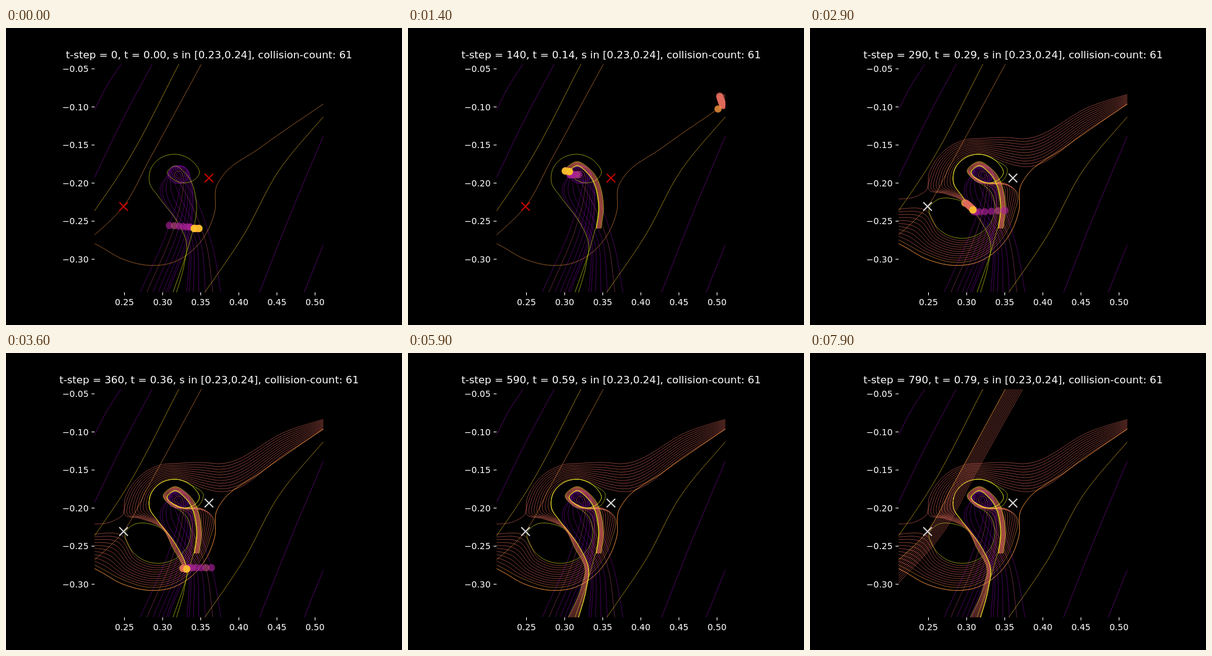
Animation, 640 px wide and 480 px high, one loop 8000 ms. Source, as an HTML page with a canvas:

```html
<!DOCTYPE html>
<html lang="en">
<head>
<meta charset="utf-8">
<title>Orbit families</title>
<style>
html, body { margin: 0; width: 640px; height: 480px; overflow: hidden; background: #000; }
canvas, svg { position: absolute; left: 0; top: 0; width: 640px; height: 480px; }
text { font: 13.89px "DejaVu Sans", sans-serif; fill: #fff; }
#title { font-size: 16.67px; }
</style>
</head>
<body>
<canvas id="plot" width="640" height="480"></canvas>
<svg id="axes" viewBox="0 0 640 480"><text id="title" x="328.2" y="49" text-anchor="middle"></text></svg>
<script>
const LOOP = 8000, STEP = 100;
const PURPLE = '#8a08b4', MAGENTA = '#a82296', PINK = '#e06a5c',
      ORANGE = '#f9973f', GOLD = '#fcce25', YELLOW = '#f0f921';
const ctx = document.getElementById('plot').getContext('2d');
const title = document.getElementById('title');
const paths = [];

// Blend two flat lists of numbers.
const mix = (a, b, u) => a.map((p, i) => p + (b[i] - p) * u);

// n points on an ellipse between two angles in degrees.
function ring([cx, cy, rx, ry, from, to], n) {
  return Array.from({ length: n }, (_, i) => {
    const a = (from + (to - from) * i / (n - 1)) * Math.PI / 180;
    return [cx + rx * Math.cos(a), cy + ry * Math.sin(a)];
  }).flat();
}

// Spline through a flat coordinate list, with tangents weighted by chord length.
function smooth(flat, sub) {
  const n = flat.length / 2;
  const p = Array.from({ length: n }, (_, i) => flat.slice(2 * i, 2 * i + 2));
  const chord = p.slice(1).map((q, i) => Math.hypot(q[0] - p[i][0], q[1] - p[i][1]));
  const slope = (i, d) => (p[i + 1][d] - p[i][d]) / chord[i];
  const tangent = (i, d) => {
    if (i === 0) return slope(0, d);
    if (i === n - 1) return slope(n - 2, d);
    const a = chord[i - 1], b = chord[i];
    return (slope(i - 1, d) * b + slope(i, d) * a) / (a + b);
  };
  const out = [];
  for (let i = 0; i < n - 1; i++) {
    for (let k = 0; k < sub; k++) {
      const s = k / sub, r = 1 - s;
      out.push([0, 1].map(d =>
        p[i][d] * r * r * (1 + 2 * s) + p[i + 1][d] * s * s * (3 - 2 * s) +
        chord[i] * s * r * (tangent(i, d) * r - tangent(i + 1, d) * s)));
    }
  }
  out.push(p[n - 1]);
  return out;
}

// keys: [point index, time] pairs; between two keys the speed is even.
function add(flat, keys, color, opt = {}) {
  const sub = 12, pts = smooth(flat, sub), len = [0], times = [];
  for (let i = 1; i < pts.length; i++) {
    len[i] = len[i - 1] + Math.hypot(pts[i][0] - pts[i - 1][0], pts[i][1] - pts[i - 1][1]);
  }
  for (let k = 0; k < keys.length - 1; k++) {
    const [i0, t0] = keys[k], [i1, t1] = keys[k + 1];
    const a = i0 * sub, b = i1 * sub;
    for (let i = a; i <= b; i++) times[i] = t0 + (t1 - t0) * (len[i] - len[a]) / (len[b] - len[a]);
  }
  paths.push({ pts, times, color, dot: color, alpha: 0.8, ...opt });
}
const still = (flat, color) => add(flat, [], color, { full: true });
const passing = (flat, t0, t1, color) =>
  add(flat, [[0, t0], [flat.length / 2 - 1, t1]], color, { full: true });

// Innermost family: rises, swirls round the centre, falls back.
for (let i = 0; i < 7; i++) {
  const u = 0.96 * (1 - (1 - i / 6) ** 1.5), warm = i === 1;
  add([
    ...mix([217,427, 264,319, 279,270], [264,427, 300,322, 303,275], u),
    ...ring([279, 237, 3 + 15 * u, 3 + 12 * u, 0, -540], 13),
    ...mix([292,254, 332,347, 348,430], [250,251, 293,347, 290,430], u)
  ], [[0, -900], [1, 0], [7, 1400], [16, 2300], [17, 3600], [18, 4450]],
  warm ? '#b8487f' : PURPLE, { full: true, dot: warm ? '#b8487f' : MAGENTA, dotAlpha: 0.65, alpha: 0.7 });
}

// Lone orbits on the outside.
passing([140,139, 160,99, 192,49], 6500, 6800, PURPLE);
passing([140,248, 190,145, 242,48], 6500, 7000, PURPLE);
passing([136,306, 190,226, 285,48], 6450, 7250, GOLD);
passing([520,135, 440,232, 385,333, 316,435], 1500, 2250, GOLD);
passing([519,160, 450,325, 406,437], 1600, 2150, PURPLE);
passing([519,335, 478,437], 1900, 2100, PURPLE);
still([270,427, 291,366, 303,324], YELLOW);

// The falling band, right and left edge.
const fall0 = [246,272, 276,312, 292,349, 288,382, 273,436];
const fall1 = [252,284, 270,316, 286,348, 279,382, 255,436];

// First bundle: up and round, then it splits at the right cross.
const rise = v => mix([304,324, 308,288, 291,236, 272,223, 261,232],
                      [312,324, 316,288, 296,230, 272,216, 254,231], v);
const big = [240, 265, 94, 114, 0, 95], small = [246, 290, 53, 50, -35, 95];
const turn0 = [285,250, 315,251], turn1 = [266,246, 277,252];
for (let k = 0; k < 11; k++) {
  const w = k / 11;
  add([
    ...rise(0.1 + 0.9 * w), ...mix(turn0, turn1, w), ...ring(mix(big, small, w), 6),
    ...mix([186,365, 152,347, 128,335], [213,328, 193,291, 130,289], w)
  ], [[0, 0], [4, 1400], [14, 2300], [15, 2650]], k ? PINK : ORANGE);
}
add([...rise(1), ...turn1, ...ring([246, 290, 53, 50, -35, 180], 8), 205,278, 236,277, ...fall1],
  [[0, 0], [4, 1400], [14, 2300], [19, 3600], [21, 4520]], YELLOW, { dot: GOLD });

const overKeys = [[0, 0], [4, 1400], [12, 2300], [15, 3600], [17, 4480]];
const over = (from, n) => [...ring([272, 242, 41, 38, from, -193], n), ...fall0];
add([...rise(0.07), 284,250, 312,246, 319,229, ...over(-50, 5)], overKeys, YELLOW, { dot: ORANGE });

// Second bundle: from the right, over the top, into the falling band.
const top0 = [530,112, 455,160, 345,224, 318,218], top1 = [530,102, 455,126, 345,179, 318,177];
const inner = [274, 244, 43, 40, -65, -190], wide = [272, 262, 84, 84, -85, -180];
for (let k = 0; k < 10; k++) {
  const u = k / 10;
  add([
    ...mix(top0, top1, u), ...ring(mix(inner, wide, u), 6),
    ...mix([238,263, ...fall0], [215,268, ...fall1], u)
  ], [[0, 1335], [9, 2300], [13, 3600], [15, 4480]], PINK);
}
add([...top1, ...ring(wide, 6), 172,272, 128,277], [[0, 1335], [9, 2300], [11, 2620]], PINK);

const outer = [530,111, 410,194, 350,239, ...ring([240, 265, 101, 119, -5, 95], 6), 190,374, 150,352, 128,341];
still(outer, ORANGE);
add(outer, [[0, 1335], [10, 2300], [11, 2600]], ORANGE);

const loop = [...rise(0), 283,250, 305,245, ...over(-10, 6)];
still(loop, YELLOW);
add(loop, overKeys, YELLOW, { dot: GOLD });

// Late bundle: lower left to the top.
const late0 = [132,345, 190,288, 232,212, 322,47], late1 = [132,384, 220,283, 262,205, 350,47];
for (let k = 10; k >= 0; k--) {
  add(mix(late0, late1, k / 10), [[0, 6400], [3, 7550]], k ? PINK : ORANGE);
}
still(late0, ORANGE);

// Place at a given time, or null when off the path.
function head({ pts, times }, now) {
  const i = times.findIndex(t => t > now);
  return i < 1 ? null : mix(pts[i - 1], pts[i], (now - times[i - 1]) / (times[i] - times[i - 1]));
}

function trace(p, now) {
  const end = p.full ? null : head(p, now);
  ctx.beginPath();
  p.pts.forEach((q, i) => { if (!end || p.times[i] <= now) ctx.lineTo(...q); });
  if (end) ctx.lineTo(...end);
  ctx.globalAlpha = p.alpha;
  ctx.strokeStyle = p.color;
  ctx.stroke();
}

function cross(x, y, color) {
  const r = 6.9;
  ctx.globalAlpha = 1;
  ctx.strokeStyle = color;
  ctx.beginPath();
  ctx.moveTo(x - r, y - r); ctx.lineTo(x + r, y + r);
  ctx.moveTo(x - r, y + r); ctx.lineTo(x + r, y - r);
  ctx.stroke();
}

function draw(now) {
  ctx.clearRect(0, 0, 640, 480);
  ctx.save();
  ctx.beginPath();
  ctx.rect(143.2, 58.5, 369.6, 368.7);
  ctx.clip();
  ctx.lineWidth = 0.7;
  for (const p of paths) if (p.full || now > p.times[0]) trace(p, now);
  ctx.lineWidth = 2;
  cross(328, 242.5, now < 1850 ? '#d00000' : '#dcdcdc');
  cross(190, 288.5, now < 2400 ? '#d00000' : '#dcdcdc');
  for (const p of paths) {
    const at = head(p, now);
    if (!at) continue;
    ctx.globalAlpha = p.dotAlpha || 0.8;
    ctx.fillStyle = p.dot;
    ctx.beginPath();
    ctx.arc(at[0], at[1], 5.9, 0, 7);
    ctx.fill();
  }
  ctx.restore();
  const step = now / 10;
  title.textContent = `t-step = ${step}, t = ${(step / 1000).toFixed(2)}, s in [0.23,0.24], collision-count: 61`;
}

// Ticks and labels
let marks = '';
const tick = d => `<path d="${d}" stroke="#fff" stroke-width="1.1"/>`;
for (let i = 0; i < 6; i++) {
  const x = 191.5 + 61.6 * i, y = 66 + 61.55 * i;
  marks += tick(`M${x} 427.2v4.9`) + tick(`M143.2 ${y}h-4.9`) +
    `<text x="${x}" y="448" text-anchor="middle">${(0.25 + 0.05 * i).toFixed(2)}</text>` +
    `<text x="133.5" y="${y + 5}" text-anchor="end">\u2212${(0.05 + 0.05 * i).toFixed(2)}</text>`;
}
document.getElementById('axes').insertAdjacentHTML('beforeend', marks);

const start = performance.now();
let shown = -1;
function frame() {
  const now = Math.floor(((performance.now() - start) % LOOP) / STEP) * STEP;
  if (now !== shown) draw(shown = now);
  requestAnimationFrame(frame);
}
frame();
</script>
</body>
</html>
```
